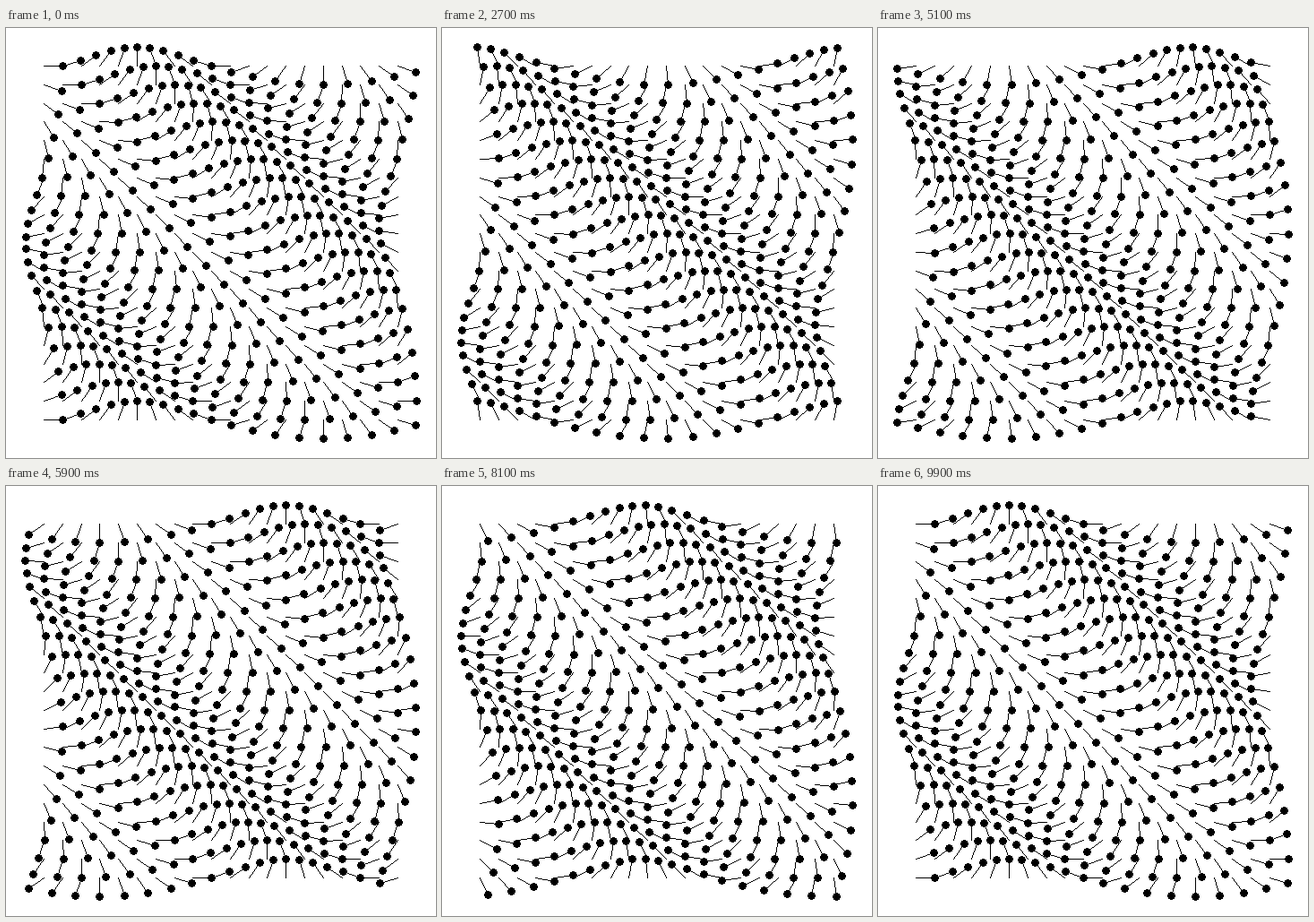
Animation of 480 by 480 pixels, one loop 10000 ms. Source, as an HTML page with a canvas:

```html
<!DOCTYPE html>
<html>
<head>
<meta charset="utf-8">
<style>
html, body { margin: 0; width: 100%; height: 100%; overflow: hidden; background: #fff; }
canvas { display: block; }
</style>
</head>
<body>
<canvas id="stage" width="480" height="480"></canvas>
<script>
const ctx = document.getElementById('stage').getContext('2d');
const TAU = 2 * Math.PI;
const COUNT = 20, FRAMES = 100, FRAME_MS = 100;
const STEP = 480 / 23.1;                 // grid spacing, also the arm length
const anchor = i => (i + 2.05) * STEP;

// One-pixel line without smoothing
function line(x0, y0, x1, y1) {
  const dx = x1 - x0, dy = y1 - y0;
  const n = Math.max(Math.abs(dx), Math.abs(dy));
  for (let k = 0; k <= n; k++) {
    ctx.fillRect(Math.round(x0 + dx * k / n), Math.round(y0 + dy * k / n), 1, 1);
  }
}

// Nine-pixel disc without smoothing
function dot(x, y) {
  for (let v = -4; v <= 4; v++) {
    const w = Math.floor(Math.sqrt(18 - v * v));
    ctx.fillRect(x - w, y + v, 2 * w + 1, 1);
  }
}

function draw(frame) {
  ctx.fillStyle = '#fff';
  ctx.fillRect(0, 0, 480, 480);
  ctx.fillStyle = '#000';
  // The turn has 101 poses for 100 frames, so one pose is skipped halfway
  const pose = Math.round(frame * 100 / (FRAMES - 1));
  const phase = TAU * pose / 100;
  for (let row = 0; row < COUNT; row++) {
    for (let col = 0; col < COUNT; col++) {
      const angle = phase + TAU * (col / COUNT - row / (COUNT - 1));
      const x = anchor(col), y = anchor(row);
      const endX = Math.floor(x + STEP * Math.cos(angle));
      const endY = Math.floor(y - STEP * Math.sin(angle));
      line(Math.floor(x), Math.floor(y), endX, endY);
      dot(endX, endY);
    }
  }
}

let shown = -1;
function tick() {
  const frame = Math.floor(performance.now() / FRAME_MS) % FRAMES;
  if (frame !== shown) draw(shown = frame);
  requestAnimationFrame(tick);
}
tick();
</script>
</body>
</html>
```
